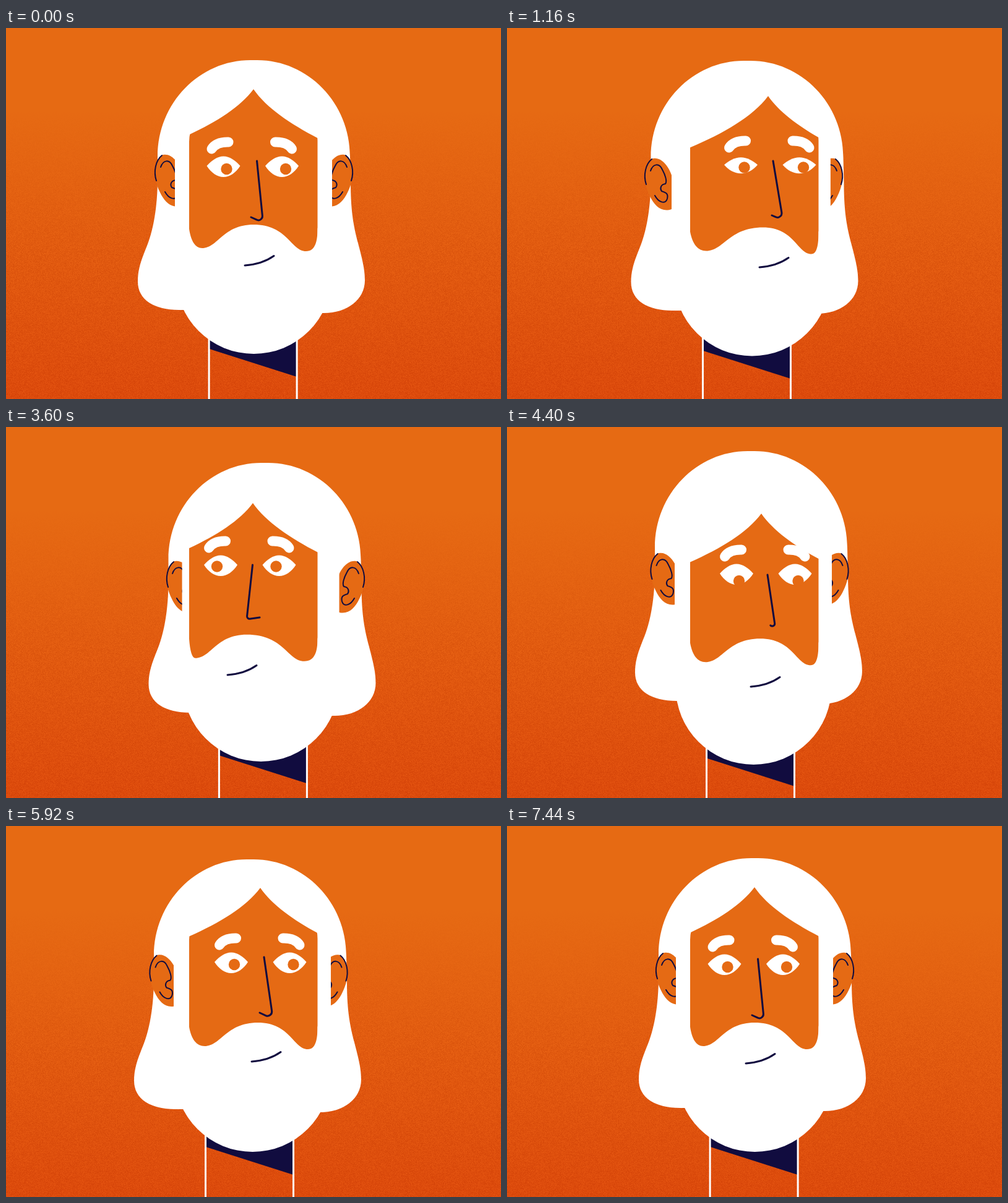
Write an HTML page with a canvas that moves like this. It is 800 by 600 pixels and loops after 7.72 s.

```html
<!DOCTYPE html>
<html lang="en">
<head>
<meta charset="utf-8">
<title>Bearded man looking around</title>
<style>
html, body { margin: 0; width: 100%; height: 100%; overflow: hidden; background: #e66a13; }
canvas { display: block; width: 800px; height: 600px; }
</style>
</head>
<body>
<canvas id="stage" width="800" height="600"></canvas>
<script>
const ctx = document.getElementById('stage').getContext('2d');
const SKIN = '#e56a14', NAVY = '#110c3f', WHITE = '#fff';
const LOOP = 7720, STEP = 40;

// Offsets are relative to the rest pose; nose, dips and peak are absolute.
// Nose: top, corner, tip, corner radius.
const rest = {
  hair: [0, 0], beard: [0, 0], ear: [0, 0], mouth: [0, 0], eye: [0, 0],
  pupil: [5, 4], open: [1], dips: [317, 400, 485], peak: [400, 99],
  nose: [405.5, 215, 415.5, 315, 396, 306, 6.5]
};
const lookRight = {
  hair: [-12.5, 1], beard: [-4.5, 3.5], ear: [-18, 6], mouth: [22, 3], eye: [26.5, -2],
  pupil: [5.5, 3.5], open: [0.78], dips: [322, 413.5, 492], peak: [422, 110],
  nose: [430, 215, 446, 311, 428, 303, 7]
};
const lookUpLeft = {
  hair: [21, 20], beard: [13.5, 0], ear: [22.5, 18], mouth: [-31, -14], eye: [-11.5, -14.5],
  pupil: [-8, -6.5], open: [1], dips: [304, 385, 480], peak: [398, 93],
  nose: [393, 202, 379.5, 295.5, 397, 292, 5]
};
const lookLeft = {
  hair: [17.5, 6], beard: [11.5, 14], ear: [19, 12], mouth: [-28, 17], eye: [-4.5, 0],
  pupil: [-6, 1.5], open: [1], dips: [306, 389, 482], peak: [399, 123],
  nose: [398.5, 223, 389, 311, 410, 308, 4]
};
const lookDown = {
  hair: [-6, -13], beard: [-2, 19], ear: [-8.5, -1], mouth: [8, 36], eye: [19.5, 14],
  pupil: [4, 11], open: [1], dips: [321, 409, 491], peak: [411, 140],
  nose: [421, 239, 434.5, 330, 426.5, 321.5, 4]
};
const lookAhead = {
  hair: [-6, 2], beard: [-2, 0], ear: [-8.5, 3.5], mouth: [11, -3], eye: [12.5, -3],
  pupil: [5, 3], open: [1], dips: [321, 407, 488], peak: [411, 100],
  nose: [417, 212, 431.5, 312, 410, 302, 7]
};

function mix(a, b, k) {
  const out = {};
  for (const part in a) out[part] = a[part].map((v, i) => v + (b[part][i] - v) * k);
  return out;
}

const quart = k => k < 0.5 ? 8 * k ** 4 : 1 - 8 * (1 - k) ** 4;
const sine = k => (1 - Math.cos(Math.PI * k)) / 2;
const farRight = mix(lookUpLeft, lookRight, 1.11);
const farDown = mix(lookLeft, lookDown, 1.087);
const ahead = mix(rest, lookAhead, 1.04);

const moves = [
  { from: 0, to: 1000, a: rest, b: farRight, ease: quart },
  { from: 1000, to: 1480, a: farRight, b: lookUpLeft, ease: quart },
  { from: 2440, to: 3600, a: lookUpLeft, b: lookLeft, ease: quart },
  { from: 3880, to: 4640, a: lookLeft, b: farDown, ease: quart },
  { from: 5000, to: 5700, a: farDown, b: ahead, ease: quart },
  { from: 5700, to: 7440, a: ahead, b: rest, ease: sine }
];

function poseAt(t) {
  const m = moves.filter(move => move.from <= t).pop();
  return mix(m.a, m.b, m.ease(Math.min(1, (t - m.from) / (m.to - m.from))));
}

function makeBackdrop() {
  const canvas = document.createElement('canvas');
  canvas.width = 800;
  canvas.height = 600;
  const c = canvas.getContext('2d');
  const image = c.createImageData(800, 600);
  let seed = 7;
  for (let i = 0; i < 800 * 600; i++) {
    seed = (seed * 1664525 + 1013904223) >>> 0;
    const k = Math.max(0, (Math.floor(i / 800) - 130) / 470);
    const grain = (seed / 2 ** 32 - 0.5) * 16 * Math.min(1, k * 2);
    image.data.set([230 - 10 * k + grain, 106 - 32 * k + grain, 19 - 7 * k + grain / 2, 255], i * 4);
  }
  c.putImageData(image, 0, 0);
  return canvas;
}
const backdrop = makeBackdrop();

function fill(path, color) {
  ctx.fillStyle = color;
  ctx.fill(path);
}

function stroke(path, color, width) {
  ctx.strokeStyle = color;
  ctx.lineWidth = width;
  ctx.stroke(path);
}

function at(x, y, draw) {
  ctx.save();
  ctx.translate(x, y);
  draw();
  ctx.restore();
}

const hairShape = new Path2D(`M245 208 C245 121 313 52 395 52 L406 52 C488 52 556 121 556 208
  L557 250 C557 300 563 325 569 348 C576 375 580 390 580 408 C580 440 550 462 511 461
  L400 470 L295 456 L280 456 C240 456 213 440 213 410 C213 395 216 382 224 362
  C236 335 244 300 245 250 Z`);
const earShape = new Path2D(`M254 205 C268 202 280 219 284 232 L284 287 C268 293 256 281 249 266
  C242 252 241 243 241 234 C241 219 248 206 254 205 Z`);
const earRim = new Path2D('M252 206 C242 214 238 232 243 247');
const earFold = new Path2D(`M250 225 C254 213 264 212 269 223 C274 232 277 242 274 246
  C266 247 265 254 268 258 C275 260 279 262 277 270 C274 280 263 276 257 265`);
const faceColumn = new Path2D(`M296 420 L296 184 Q296 168 303 158 L303 60 L499 60 L499 160
  Q503.5 170 503.5 182 L503.5 420 Z`);
const eyeShape = new Path2D(`M-27 -1 C-19 -10 -10 -16.5 0 -16.5 C10 -16.5 19 -10 27 -1
  C20 10 10 17 0 17 C-10 17 -20 10 -27 -1 Z`);
const pupilShape = new Path2D();
pupilShape.arc(0, 0, 9.2, 0, Math.PI * 2);
const browShape = new Path2D('M-19 -28.5 Q-11.5 -40 8 -39.5');
const smile = new Path2D('M386 384 Q414 382 433 368.5');

function drawNeck(p) {
  const x = p.hair[0] * 0.93 - 0.4, y = p.beard[1] * 0.88;
  at(x, 0, () => {
    fill(new Path2D(`M329 480 L470 480 L470 ${564 + y} L329 ${519 + y} Z`), NAVY);
    ctx.fillStyle = WHITE;
    ctx.fillRect(327, 480, 3, 120);
    ctx.fillRect(469, 480, 3, 120);
  });
}

function drawHair(p) {
  at(p.hair[0], p.hair[1], () => fill(hairShape, WHITE));
  const beard = new Path2D();
  beard.arc(400.5 + p.beard[0], 401 + p.beard[1], 126, 0, Math.PI * 2);
  fill(beard, WHITE);
}

function drawEar(dx, dy, edge) {
  ctx.save();
  ctx.beginPath();
  ctx.rect(0, 0, edge, 600);
  ctx.clip();
  ctx.translate(dx, dy);
  fill(earShape, SKIN);
  stroke(earRim, NAVY, 2);
  stroke(earFold, NAVY, 2);
  ctx.restore();
}

function drawEars(p) {
  const [dx, dy] = p.ear, turn = p.hair[0];
  const shift = turn * (turn > 0 ? 0.66 : 0.33);
  drawEar(dx, dy, 273 + shift);
  ctx.save();
  ctx.translate(801, 0);
  ctx.scale(-1, 1);
  drawEar(-dx, dy, 274 - shift);
  ctx.restore();
}

function drawFace(p) {
  const [px, py] = p.peak, [left, mid, right] = p.dips;
  const y = p.beard[1] * 1.27, wl = mid - left, wr = right - mid;
  const face = new Path2D();
  face.moveTo(px - 130, py + 85);
  face.bezierCurveTo(px - 75, py + 62, px - 25, py + 34, px, py);
  face.bezierCurveTo(px + 25, py + 36, px + 75, py + 66, px + 130, py + 92);
  face.lineTo(503.5, 325 + y);
  face.bezierCurveTo(503.5, 345 + y, right + (503.5 - right) * 0.8, 361 + y, right, 361 + y);
  face.bezierCurveTo(mid + wr * 0.71, 361 + y, mid + wr * 0.65, 318 + y, mid, 318 + y);
  face.bezierCurveTo(left + wl * 0.4, 318 + y, left + wl * 0.31, 356 + y, left, 356 + y);
  face.bezierCurveTo(left - (left - 296) * 0.52, 356 + y, 296 + (left - 296) * 0.14, 345 + y, 296, 325 + y);
  face.closePath();
  ctx.save();
  ctx.clip(faceColumn);
  fill(face, SKIN);
  ctx.restore();
}

function drawEyes(p) {
  const [x, y] = p.eye, [lookX, lookY] = p.pupil;
  [0, 1].forEach(side => at(351.5 + x + side * 94.5, 224 + y, () => {
    ctx.save();
    ctx.scale(1, p.open[0]);
    fill(eyeShape, WHITE);
    ctx.restore();
    at(lookX + side, lookY, () => fill(pupilShape, SKIN));
    if (side) {
      ctx.translate(-3, 0);
      ctx.scale(-1, 1);
    }
    stroke(browShape, WHITE, 16);
  }));
}

function drawNose(p) {
  const [x, y, cornerX, cornerY, tipX, tipY, radius] = p.nose;
  const nose = new Path2D();
  nose.moveTo(x, y);
  nose.arcTo(cornerX, cornerY, tipX, tipY, radius);
  nose.lineTo(tipX, tipY);
  stroke(nose, NAVY, 3);
}

function render() {
  const now = performance.now() % LOOP;
  const p = poseAt(Math.floor(now / STEP) * STEP);
  ctx.lineCap = ctx.lineJoin = 'round';
  ctx.drawImage(backdrop, 0, 0);
  drawNeck(p);
  drawHair(p);
  drawEars(p);
  drawFace(p);
  drawEyes(p);
  drawNose(p);
  at(p.mouth[0], p.mouth[1], () => stroke(smile, NAVY, 3));
  requestAnimationFrame(render);
}
render();
</script>
</body>
</html>
```
